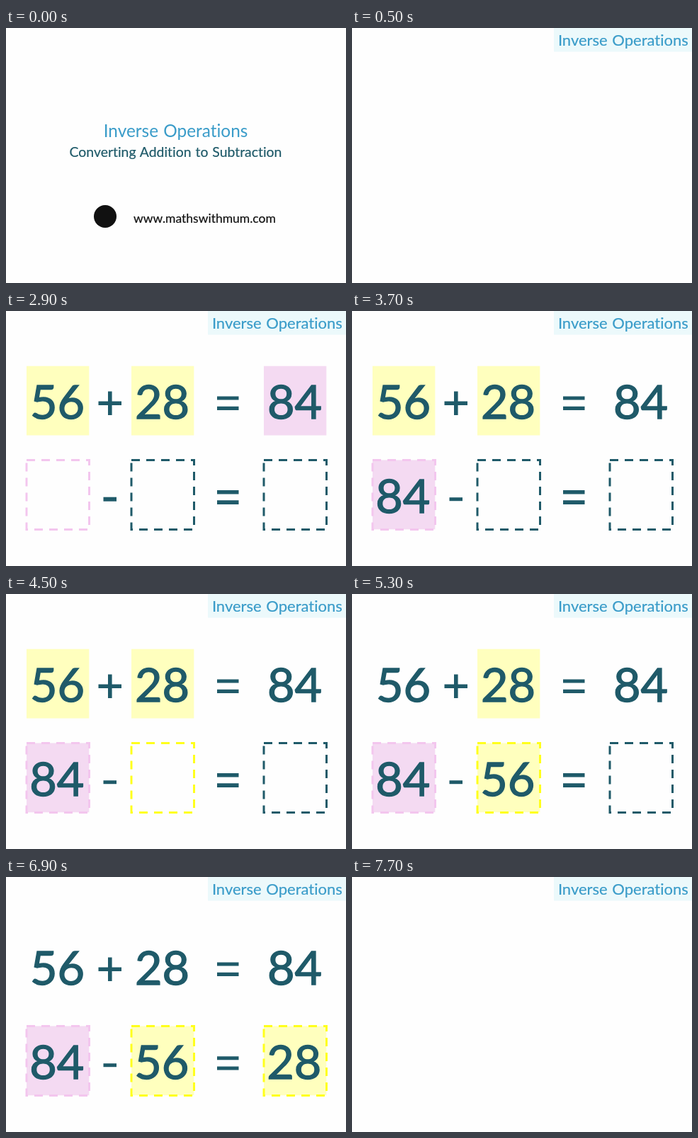
Animation, 480 px wide and 360 px high, one loop 8000 ms. Source, as an HTML page:

```html
<!DOCTYPE html>
<html lang="en">
<head>
<meta charset="utf-8">
<title>Inverse Operations</title>
<style>
  html, body { margin: 0; width: 100%; height: 100%; overflow: hidden; background: #fefefe; }
  svg { display: block; width: 100%; height: 100%; }
  text {
    font-family: Lato, "Open Sans", sans-serif;
    font-variant-ligatures: none;
    text-anchor: middle;
    word-spacing: 1px;
  }
</style>
</head>
<body>
<svg id="stage" viewBox="0 0 480 360"></svg>
<script>
const LOOP = 8000;
const DARK = '#1f5a69', BLUE = '#3a9cc9', BLACK = '#111';
const PINK = '#f4daf2', PINK_LINE = '#f3c6ee';
const YELLOW = '#ffffbe', YELLOW_LINE = '#ffff1c';
const COLUMNS = [29, 177, 364];
const ROWS = [77.7, 210.5];

// Moments at which the picture changes.
const T = { header: 500, sum: 1300, blanks: 2100, pinkBox: 2900, first: 3700,
            yellowBox: 4500, second: 5300, lastBox: 6100, third: 6900, clear: 7700 };

const stage = document.getElementById('stage');
const parts = [];

function add(tag, attributes, from, to, content = '') {
  const node = document.createElementNS('http://www.w3.org/2000/svg', tag);
  for (const [key, value] of Object.entries(attributes)) node.setAttribute(key, value);
  node.textContent = content;
  stage.append(node);
  parts.push({ node, from, to });
}

const label = (content, x, y, size, fill, from, to, weight = 0) =>
  add('text', { x, y, 'font-size': size, fill, stroke: fill, 'stroke-width': weight },
    from, to, content);

const sign = (d, from, to, width = 5.6) =>
  add('path', { d, stroke: DARK, 'stroke-width': width, fill: 'none' }, from, to);

const panel = (column, row, fill, from, to) =>
  add('rect', { x: COLUMNS[column], y: ROWS[row], width: 88.3, height: 97.8, fill }, from, to);

const outline = (column, color, from, to) =>
  add('rect', { x: COLUMNS[column], y: ROWS[1], width: 88.5, height: 98, fill: 'none',
    stroke: color, 'stroke-width': 3, 'stroke-dasharray': '12 9' }, from, to);

const number = (value, column, row, from) =>
  label(value, COLUMNS[column] + (row ? 42.7 : 43.5), row ? 285 : 152.2, 66.5, DARK,
    from, T.clear, 1.4);

const equals = (y, from, to, width) =>
  sign(`M298 ${y}h30.5m-30.5 14.3h30.5`, from, to, width);

// Title card
label('Inverse Operations', 239.5, 154, 24.4, BLUE, 0, T.header);
label('Converting Addition to Subtraction', 239.5, 182, 19.4, DARK, 0, T.header, 0.2);
add('circle', { cx: 140, cy: 266, r: 16, fill: BLACK }, 0, T.header);
label('www.mathswithmum.com', 280.5, 275, 17.5, BLACK, 0, T.header, 0.2);

// Header
add('rect', { x: 285, y: 0, width: 195, height: 33.5, fill: '#ecf9fb' }, T.header, LOOP);
label('Inverse Operations', 382.8, 24.6, 22, BLUE, T.header, LOOP, 0.2);

// Addition
panel(0, 0, YELLOW, T.sum, T.second);
panel(1, 0, YELLOW, T.sum, T.third);
panel(2, 0, PINK, T.sum, T.first);
['56', '28', '84'].forEach((value, column) => number(value, column, 0, T.sum));
sign('M130.5 130.2h32.5M146.8 113.5v33.5', T.sum, T.clear);
equals(123, T.sum, T.clear, 5.2);

// Subtraction: each blank is highlighted, then filled
const steps = [
  ['84', PINK, PINK_LINE, T.pinkBox, T.first],
  ['56', YELLOW, YELLOW_LINE, T.yellowBox, T.second],
  ['28', YELLOW, YELLOW_LINE, T.lastBox, T.third],
];
steps.forEach(([value, fill, line, marked, filled], column) => {
  panel(column, 1, fill, filled, T.clear);
  outline(column, DARK, T.blanks, marked);
  outline(column, line, marked, T.clear);
  number(value, column, 1, filled);
});
sign('M137.5 265.7h18.5', T.blanks, T.first, 6);
sign('M137.5 265.7h18.5', T.first, T.clear, 5);
equals(255.8, T.blanks, T.third);
equals(255.8, T.third, T.clear, 5);

const start = performance.now();
function draw() {
  const time = (performance.now() - start) % LOOP;
  for (const { node, from, to } of parts)
    node.style.display = time >= from && time < to ? '' : 'none';
  requestAnimationFrame(draw);
}
draw();
</script>
</body>
</html>
```
